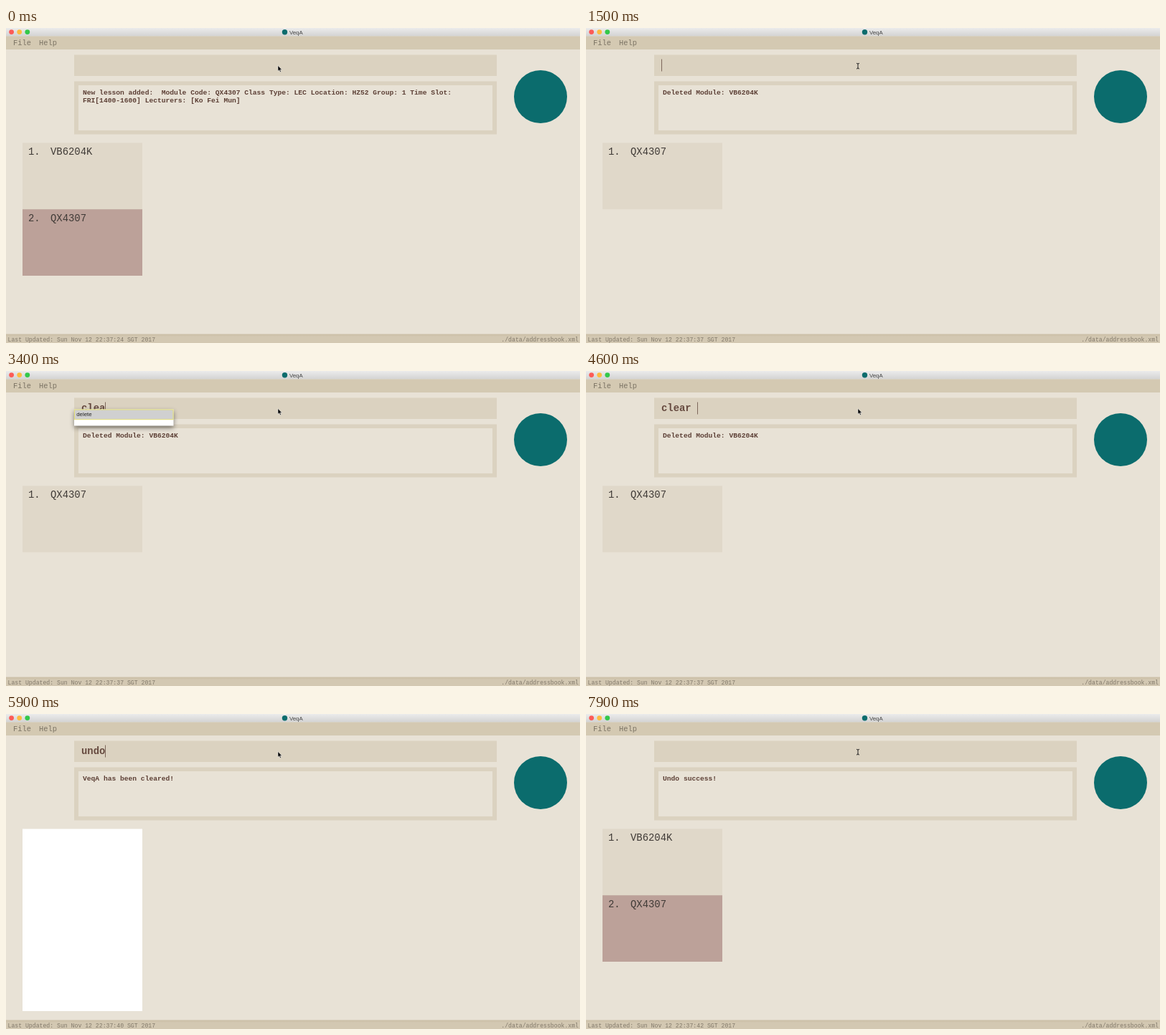
Animation, 800 px wide and 440 px high, one loop 8000 ms. Source, as an HTML page:

```html
<!DOCTYPE html>
<html lang="en">
<head>
<meta charset="utf-8">
<title>Lesson planner</title>
<style>
  html, body { margin: 0; width: 100%; height: 100%; overflow: hidden; background: #e8e2d6; }
  svg { display: block; width: 800px; height: 440px; }
  text { font-family: "Courier New", "Liberation Mono", monospace; white-space: pre; }
  .sans { font-family: "Liberation Sans", Arial, sans-serif; }
  .menu { font-size: 10.4px; fill: #7b7364; }
  .status { font-size: 8.17px; fill: #82796a; }
  .message { font-size: 9.64px; font-weight: bold; fill: #5c3f35; }
  .command { font-size: 13.9px; font-weight: bold; fill: #664a3f; }
  .card { font-size: 13.9px; fill: #403b37; }
  #popup { filter: drop-shadow(0 3px 3px #0007); }
</style>
</head>
<body>
<svg viewBox="0 0 800 440">
  <defs>
    <linearGradient id="chrome" x2="0" y2="1">
      <stop stop-color="#ebebeb"/><stop offset="1" stop-color="#d3d3d3"/>
    </linearGradient>
    <linearGradient id="footer" x2="0" y2="1">
      <stop stop-color="#cabea5"/><stop offset=".3" stop-color="#d3c8b2"/><stop offset="1" stop-color="#d3c8b2"/>
    </linearGradient>
  </defs>
  <rect width="800" height="440" fill="#e8e2d6"/>

  <rect width="800" height="11.5" fill="url(#chrome)"/>
  <circle cx="7.6" cy="5.6" r="3.4" fill="#fc5b57"/>
  <circle cx="18.7" cy="5.6" r="3.4" fill="#fdbc40"/>
  <circle cx="29.8" cy="5.6" r="3.4" fill="#34c84a"/>
  <circle cx="388.5" cy="5.8" r="3.7" fill="#0b6c6d"/>
  <text class="sans" x="395" y="8.6" font-size="7.8" fill="#454545">VeqA</text>

  <rect y="11.5" width="800" height="18.5" fill="#d4c9b2"/>
  <text class="menu" x="10" y="24">File</text>
  <text class="menu" x="46" y="24">Help</text>

  <rect x="95" y="37.5" width="589" height="29.5" fill="#dbd2c0"/>
  <rect x="95" y="74.5" width="589" height="74" fill="#dbd2c0"/>
  <rect x="101" y="80" width="577" height="63" fill="#e8e2d6"/>
  <circle cx="745" cy="96" r="37" fill="#0b6c6d"/>

  <text class="message" id="line1" x="107" y="92.5"></text>
  <text class="message" id="line2" x="107" y="104.2"></text>
  <text class="command" id="command" x="105" y="56.3"></text>
  <path id="caret" d="M.5 43.5V60.5" stroke="#7d675b"/>

  <rect id="blank" x="23" y="160.5" width="167" height="254.5" fill="#fff"/>
  <g id="card1">
    <rect x="23" y="160.5" width="167" height="92.7" fill="#e0d8c9"/>
    <text class="card" x="31" y="176.8">1.</text>
    <text class="card" id="name1" x="62" y="176.8"></text>
  </g>
  <g id="card2">
    <rect x="23" y="253.2" width="167" height="92.8" fill="#bca199"/>
    <text class="card" x="31" y="269.5">2.</text>
    <text class="card" id="name2" x="62" y="269.5"></text>
  </g>

  <rect y="427.5" width="800" height="12.5" fill="url(#footer)"/>
  <text class="status" id="stamp" x="2.5" y="438"></text>
  <text class="status" x="798" y="438" text-anchor="end">./data/addressbook.xml</text>

  <g id="popup">
    <rect x="95" y="53.5" width="138.5" height="23" fill="#fff"/>
    <rect x="95.5" y="54" width="137.5" height="13.7" fill="#d0d0d0" stroke="#e4e077"/>
    <text class="sans" x="98.2" y="62.9" font-size="7.9" fill="#222">delete</text>
  </g>

  <path id="arrow" d="M379 52.5V60.3L380.8 58.7L382.2 61.6L383.4 61L382.1 58.2H384.5Z"
        fill="#000" stroke="#fff" stroke-width=".5"/>
  <path id="beam" d="M377 49.3Q379 49.3 379 50.7Q379 49.3 381 49.3M379 50.5V56M377 57Q379 57 379 55.6Q379 57 381 57"
        fill="none" stroke="#222"/>
</svg>
<script>
const LOOP = 8000, BLINK = 500, CHAR = 8.34;
const $ = id => document.getElementById(id);
const FIRST = "VB6204K", SECOND = "QX4307";

// One keystroke every 100 ms, starting at the given time.
const typed = (start, word) =>
  [...word].map((_, i) => [start + i * 100, word.slice(0, i + 1)]);

const commands = [
  [-500, ""],
  ...typed(200, "delete 1"), [1200, ""],
  ...typed(3100, "clea"), [3600, "clear"], [4200, "clear "], [4800, ""],
  ...typed(5600, "undo"), [6100, ""],
  ...typed(6500, "undo"), [7400, ""]
];

// time, seconds on the clock, module list, message lines
const views = [
  [0, 24, [FIRST, SECOND],
    `New lesson added:  Module Code: ${SECOND} Class Type: LEC Location: HZ52 Group: 1 Time Slot:`,
    "FRI[1400-1600] Lecturers: [Ko Fei Mun]"],
  [1200, 37, [SECOND], `Deleted Module: ${FIRST}`],
  [4800, 40, [], "VeqA has been cleared!"],
  [6100, 41, [SECOND], "Undo success!"],
  [7400, 42, [FIRST, SECOND], "Undo success!"]
];

const latest = (list, t) => list.findLast(entry => entry[0] <= t);
const within = (t, from, to) => t >= from && t < to;
const show = (id, on) => $(id).setAttribute("visibility", on ? "visible" : "hidden");
const write = (id, text = "") => {
  if ($(id).textContent !== text) $(id).textContent = text;
};

function draw(t) {
  const [since, command] = latest(commands, t);
  write("command", command);
  const caretX = Math.floor(105 + command.length * CHAR);
  $("caret").setAttribute("transform", `translate(${caretX})`);
  show("caret", (t - since) % (2 * BLINK) < BLINK);
  show("popup", within(t, 300, 800) || within(t, 3200, 3600));

  const [, seconds, modules, line1, line2] = latest(views, t);
  write("stamp", `Last Updated: Sun Nov 12 22:37:${seconds} SGT 2017`);
  write("line1", line1);
  write("line2", line2);
  write("name1", modules[0]);
  write("name2", modules[1]);
  show("card1", modules.length > 0);
  show("card2", modules.length > 1);
  show("blank", !modules.length);

  const beam = within(t, 1200, 3100) || t >= 6100;
  show("beam", beam);
  show("arrow", !beam);
}

const begin = performance.now();
function tick() {
  draw((performance.now() - begin) % LOOP);
  requestAnimationFrame(tick);
}
tick();
</script>
</body>
</html>
```
